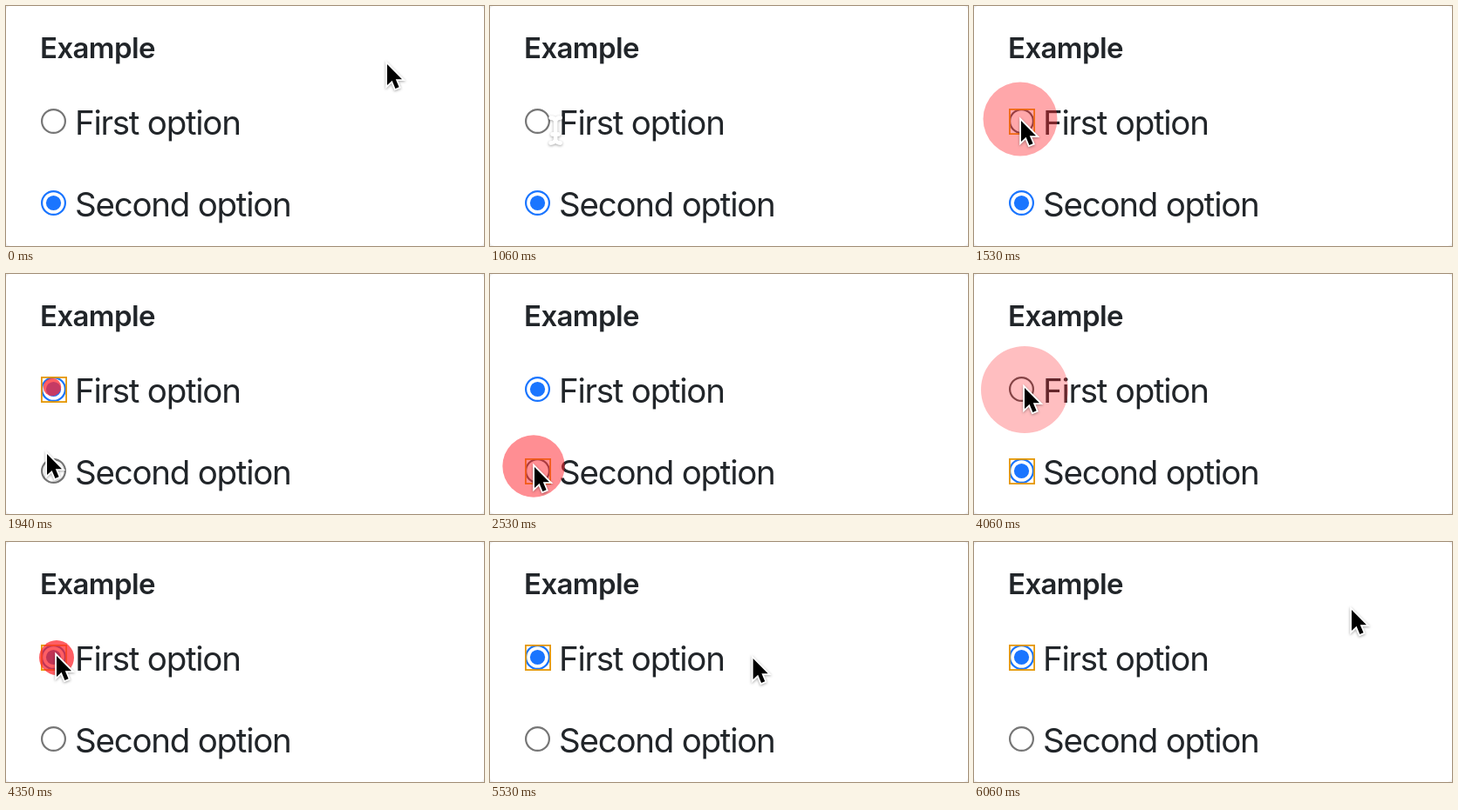
Recreate the animation shown at these times as an HTML page. Size 548 px wide and 276 px high, loop 8000 ms.

```html
<!DOCTYPE html>
<html lang="en">
<head>
<meta charset="utf-8">
<title>Radio buttons</title>
<style>
  html, body { margin: 0; width: 100%; height: 100%; overflow: hidden; background: #f1f1f1; }
  svg { display: block; width: 548px; height: 276px; }
  text { font: 38.5px Inter, "Liberation Sans", sans-serif; font-optical-sizing: none; letter-spacing: -1.25px; fill: #212529; }
  .title { font-size: 33px; font-weight: 600; letter-spacing: -.6px; }
  .ring { fill: #fff; stroke-width: 2.2; }
  .focus { fill: none; stroke: #e59700; stroke-width: 1.8; }
  #ripple { fill: #ff2830; }
  #arrow, #beam { filter: drop-shadow(0 1.5px 1.5px rgba(0, 0, 0, .35)); }
  #arrow { paint-order: stroke; stroke: #fff; stroke-width: 3.6; }
  #beam { fill: none; stroke-linecap: round; }
</style>
</head>
<body>
<svg viewBox="0 0 548 276">
  <rect width="548" height="276" rx="5" fill="#fff"/>
  <text class="title" x="39" y="60">Example</text>
  <text x="79" y="148">First option</text>
  <text x="79" y="242">Second option</text>
  <g class="radio" transform="translate(54.5 132.5)">
    <circle class="ring" r="13.4"/><circle class="dot" r="8.6"/>
    <rect class="focus" x="-13.6" y="-13.6" width="28.2" height="28.2"/>
  </g>
  <g class="radio" transform="translate(54.5 226.5)">
    <circle class="ring" r="13.4"/><circle class="dot" r="8.6"/>
    <rect class="focus" x="-13.6" y="-13.6" width="28.2" height="28.2"/>
  </g>
  <circle id="ripple"/>
  <path id="arrow" d="M1 2V26L6.6 20.8 10.4 30 14.6 28.2 10.8 19.2H18Z"/>
  <g id="beam">
    <path id="beamShape" stroke="#fff" stroke-width="4.4" d="M-5.5-14.5Q-1-14.5 0-11 1-14.5 5.5-14.5M-5.5 14.5Q-1 14.5 0 11 1 14.5 5.5 14.5M0-11V11M-3.5 4.5H3.5"/>
    <use href="#beamShape"/>
  </g>
</svg>
<script>
const LOOP = 8000, FPS = 17, RIPPLE = 650, RELEASE = 120;
const $ = id => document.getElementById(id);
const radios = [...document.querySelectorAll('.radio')];

// Pointer positions: time, x, y
const path = [
  [180, 436, 65], [300, 424, 69], [480, 340, 88], [650, 225, 112], [820, 125, 132], [1000, 79, 142],
  [1060, 75, 143], [1180, 59, 134], [1290, 53, 130],
  [1640, 53, 130], [1760, 49, 155], [1940, 46, 205], [2060, 49, 217], [2180, 50, 220],
  [2820, 50, 220], [2940, 52, 200], [3120, 53, 160], [3240, 54, 150], [3360, 57, 136], [3470, 57, 129],
  [5060, 57, 129], [5180, 78, 133], [5350, 185, 136], [5530, 301, 132], [5700, 365, 110],
  [5880, 413, 89], [5950, 424, 82], [6060, 432, 76]
];
// Presses: time, radio, x, y
const clicks = [[1470, 0, 53, 130], [2410, 1, 50, 221], [4060, 0, 58, 133]];

function pointerAt(t) {
  const i = path.findIndex(p => p[0] > t);
  if (i === 0) return path[0].slice(1);
  if (i < 0) return path.at(-1).slice(1);
  const [a, b] = [path[i - 1], path[i]];
  const k = (t - a[0]) / (b[0] - a[0]);
  return [1, 2].map(n => a[n] + (b[n] - a[n]) * k);
}

function drawRadios(t, x, y) {
  const focused = clicks.findLast(c => t >= c[0])?.[1];
  const checked = clicks.findLast(c => t >= c[0] + RELEASE)?.[1] ?? 1;
  radios.forEach((radio, i) => {
    const [ring, dot, focus] = radio.children;
    const hover = Math.hypot(x - 54.5, y - 132.5 - 94 * i) < 21 && x < 68;
    const on = i === checked;
    const color = on ? (hover ? '#005cc8' : '#1a75ff') : (hover ? '#4f4f4f' : '#767676');
    ring.style.stroke = dot.style.fill = color;
    dot.style.display = on ? '' : 'none';
    focus.style.display = i === focused ? '' : 'none';
  });
}

function drawRipple(t) {
  const click = clicks.find(c => t >= c[0] - 5 && t < c[0] + RIPPLE);
  $('ripple').style.display = click ? '' : 'none';
  if (!click) return;
  const u = Math.max(0, t - click[0]) / RIPPLE;
  $('ripple').setAttribute('cx', click[2]);
  $('ripple').setAttribute('cy', click[3]);
  $('ripple').setAttribute('r', 7 + 43 * (1 - u) ** 2);
  $('ripple').style.opacity = Math.min(.3 + 1.2 * u, .75, (1 - u) * 5);
}

function draw(now) {
  const t = Math.floor((now % LOOP + 5) * FPS / 1000) * 1000 / FPS;
  const [x, y] = pointerAt(t);
  const overText = x > 67 && x < 273 && y > 112 && y < 158;
  drawRadios(t, x, y);
  drawRipple(t);
  for (const [id, shown] of [['arrow', !overText], ['beam', overText]]) {
    $(id).setAttribute('transform', `translate(${x} ${y})`);
    $(id).style.display = shown ? '' : 'none';
  }
}

const start = performance.now();
function tick() {
  draw(performance.now() - start);
  requestAnimationFrame(tick);
}
tick();
</script>
</body>
</html>
```
